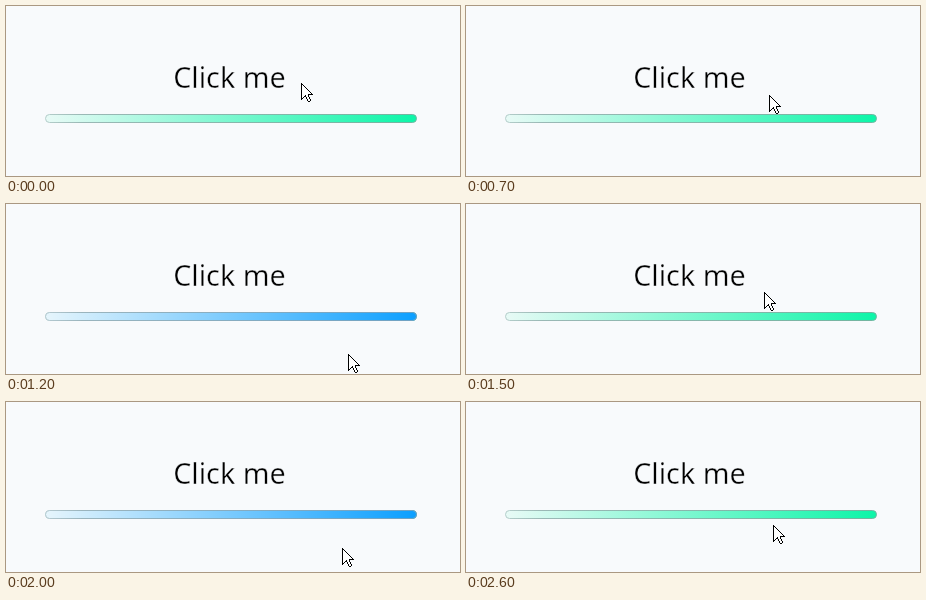
Recreate the animation shown at these times as an HTML page. Size 454x170 px, loop 2700 ms.

```html
<!DOCTYPE html>
<html lang="en">
<head>
<meta charset="utf-8">
<title>Click me</title>
<style>
  html, body { margin: 0; width: 100%; height: 100%; overflow: hidden; background: #f8fafc; }
  svg { display: block; width: 454px; height: 170px; }
  /* A hairline in the page colour thins the letters */
  text { font: 28.7px "Noto Sans", "Open Sans", sans-serif; fill: #000; stroke: #f8fafc; stroke-width: .4px; }
  .blue { animation: idle 2.7s step-end infinite; }
  .cursor { animation: move 2.7s step-end infinite; }

  /* The bar is green while hovered, blue once the pointer has left */
  @keyframes idle {
    0%, 22.2%, 51.85%, 81.48%, 100% { opacity: 0; }
    11.11%, 44.44%, 74.07% { opacity: 1; }
  }
  @keyframes move {
    0%, 100% { transform: translate(295px, 77px); }
    7.4%   { transform: translate(318px, 113px); }
    11.11% { transform: translate(340px, 147px); }
    14.81% { transform: translate(341px, 147px); }
    22.22% { transform: translate(321px, 117px); }
    25.92% { transform: translate(303px, 89px); }
    40.74% { transform: translate(323px, 120px); }
    44.44% { transform: translate(342px, 150px); }
    51.85% { transform: translate(320px, 119px); }
    55.55% { transform: translate(298px, 88px); }
    59.25% { transform: translate(298px, 86px); }
    70.37% { transform: translate(317px, 116px); }
    74.07% { transform: translate(336px, 146px); }
    81.48% { transform: translate(315px, 118px); }
    85.18% { transform: translate(294px, 90px); }
    88.88% { transform: translate(279px, 68px); }
    96.29% { transform: translate(307px, 123px); }
  }
</style>
</head>
<body>
<svg viewBox="0 0 454 170">
  <defs>
    <linearGradient id="greenFill">
      <stop stop-color="#e8faf6"/>
      <stop offset="1" stop-color="#0cf5a8"/>
    </linearGradient>
    <linearGradient id="greenEdge">
      <stop stop-color="#b4cdca"/>
      <stop offset=".1" stop-color="#9ab8b5"/>
      <stop offset="1" stop-color="#72b5a0"/>
    </linearGradient>
    <linearGradient id="blueFill">
      <stop stop-color="#e6f5fc"/>
      <stop offset="1" stop-color="#0c9fff"/>
    </linearGradient>
    <linearGradient id="blueEdge">
      <stop stop-color="#b4c9d0"/>
      <stop offset=".1" stop-color="#9ab4bd"/>
      <stop offset="1" stop-color="#6fa2c4"/>
    </linearGradient>
    <rect id="bar" x="39.5" y="108.5" width="371" height="8" rx="4"/>
  </defs>

  <text x="167.2" y="82">Click me</text>
  <use href="#bar" fill="url(#greenFill)" stroke="url(#greenEdge)"/>
  <use class="blue" href="#bar" fill="url(#blueFill)" stroke="url(#blueEdge)"/>
  <path class="cursor" d="M.5 .5V16.5L4.5 12.5 6.5 17.5 7.5 18.5H8.5L9.5 17.5 7.5 12.5V11.5H11.5Z"
        fill="#fff" stroke="#000" shape-rendering="crispEdges"/>
</svg>
</body>
</html>
```
